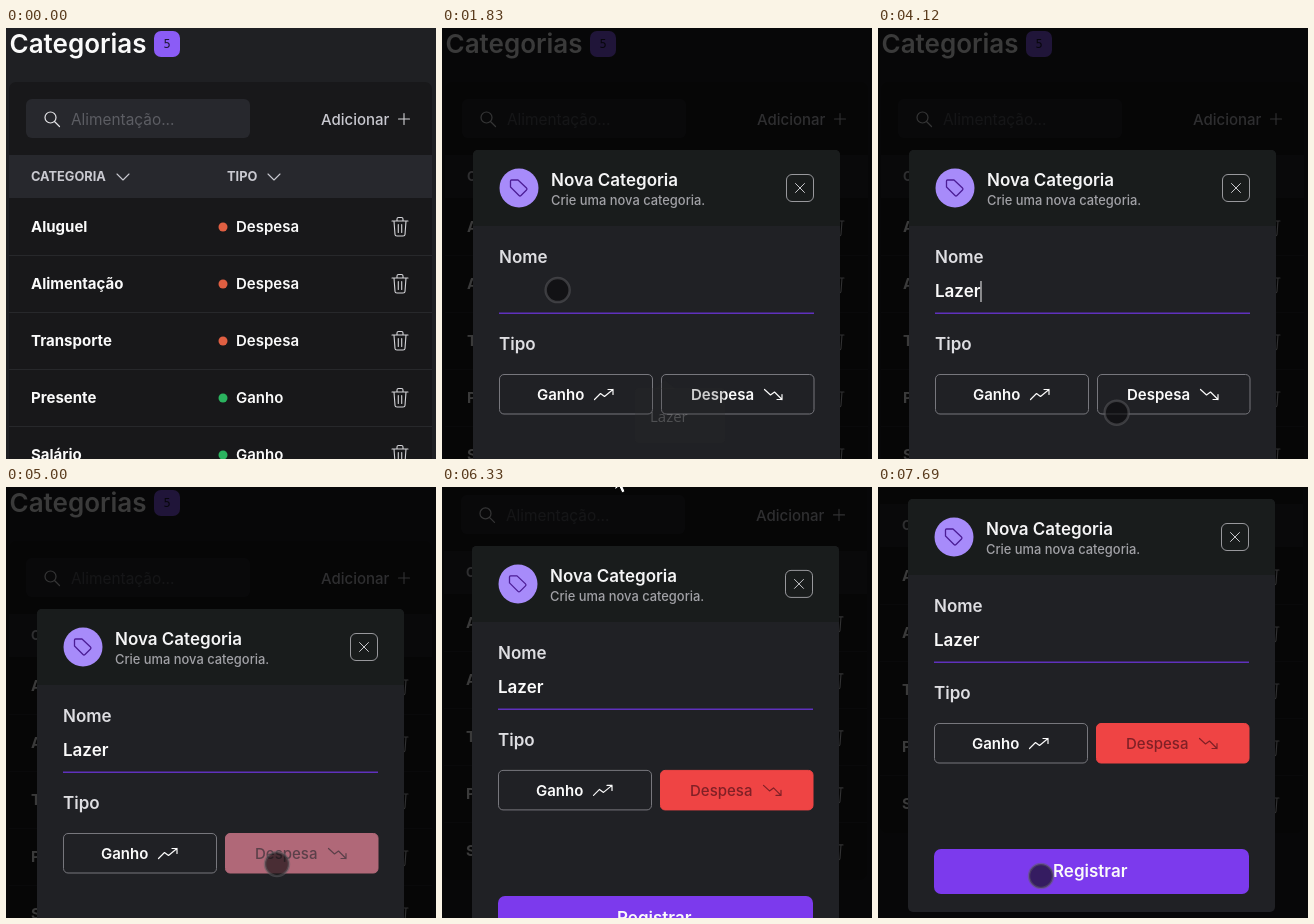
An HTML page with a canvas for the animation above (8 s loop, 430 by 431 pixels).

```html
<!DOCTYPE html>
<html lang="pt">
<head>
<meta charset="utf-8">
<style>
html, body { margin: 0; width: 100%; height: 100%; overflow: hidden; background: #1f2023; }
canvas { display: block; }
</style>
</head>
<body>
<canvas width="430" height="431"></canvas>
<script>
const W = 430, H = 431, LOOP = 8000;
const ctx = document.querySelector('canvas').getContext('2d');

const clamp = v => Math.max(0, Math.min(1, v));
const ramp = (t, a, b) => clamp((t - a) / (b - a));
const smooth = p => p * p * (3 - 2 * p);
const linear = p => p;

// Interpolates rows of [time, value, value, ...].
function track(keys, t, ease = linear) {
  let i = 0;
  while (i < keys.length - 2 && t >= keys[i + 1][0]) i++;
  const [a, b] = [keys[i], keys[i + 1]];
  const p = ease(ramp(t, a[0], b[0]));
  return a.slice(1).map((v, k) => v + (b[k + 1] - v) * p);
}
const rgb = c => `rgb(${c.map(Math.round)})`;

const POINTER = [
  [130, 407, 367], [800, 373, 100], [1350, 373, 100], [1760, 118, 261], [2110, 96, 271],
  [3760, 96, 271], [4300, 288, 424], [4520, 284, 402], [4750, 271, 377], [5040, 271, 377],
  [5350, 184, 42], [5620, 173, -14], [6400, 173, -14], [6700, 173, -18], [7280, 173, -18],
  [7690, 163, 389], [LOOP, 163, 389]
];
const SCROLL = [[5820, 0], [6330, 63], [6680, 98], [6810, 102], [7090, 110]];
const BUTTON = [[4590, 32, 33, 37], [5000, 176, 104, 120], [5300, 239, 68, 68]];
const BUTTON_TEXT = [[4590, 250, 250, 250], [5000, 92, 64, 74], [5300, 128, 32, 38]];
const TYPED = [2570, 2900, 3110, 3430, 3760];

const ICONS = {
  search: new Path2D('M11 5.5A5.5 5.5 0 1 1 0 5.5A5.5 5.5 0 1 1 11 5.5M9.5 9.5L14.5 14.5'),
  plus: new Path2D('M.5 6H11.5M6 .5V11.5'),
  down: new Path2D('M0 0L6 6L12 0'),
  trash: new Path2D('M0 3.5H16M5 3V1.5Q5 0 6.5 0H9.5Q11 0 11 1.5V3M2 3.5L3 17Q3 18.5 5 18.5H11Q13 18.5 13 17L14 3.5M6.3 7V15M9.7 7V15'),
  tag: new Path2D('M1 2V8L9.5 16.5Q10.5 17.5 11.5 16.5L17 11Q18 10 17 9L8.5 1H2Q1 1 1 2Z'),
  rise: new Path2D('M0 11.5L6 5.5L10 8.5L18.5 1.5M13.5 1.5H18.5V6.5'),
  fall: new Path2D('M0 1.5L6 7L10 4L17.5 11.5M12.5 11.5H17.5V6.5'),
  close: new Path2D('M.5 .5L9.5 9.5M9.5 .5L.5 9.5'),
  arrow: new Path2D('M0 0V17L4 13.5L7 20L10 18.5L7.5 12.5H13Z')
};

function text(s, x, y, size, weight, color, family = 'Inter, sans-serif') {
  ctx.font = `${weight} ${size}px ${family}`;
  ctx.fillStyle = color;
  ctx.fillText(s, x, y);
}
function box(x, y, w, h, r, fill, stroke) {
  ctx.beginPath();
  ctx.roundRect(x, y, w, h, r);
  if (fill) { ctx.fillStyle = fill; ctx.fill(); }
  if (stroke) { ctx.strokeStyle = stroke; ctx.lineWidth = 1; ctx.stroke(); }
}
function disc(x, y, r, color) {
  ctx.beginPath();
  ctx.arc(x, y, r, 0, 7);
  ctx.fillStyle = color;
  ctx.fill();
}
function icon(name, x, y, color, width = 1.1) {
  ctx.save();
  ctx.translate(x, y);
  ctx.lineWidth = width;
  ctx.lineJoin = ctx.lineCap = 'round';
  ctx.strokeStyle = color;
  ctx.stroke(ICONS[name]);
  ctx.restore();
}

function page(t) {
  text('Categorias', 3.5, 25, 26, 600, '#fafafa');
  box(148, 3, 26, 26, 7, '#8b5cf6');
  text('5', 157.5, 20, 12, 400, '#1e1836', '"DejaVu Sans Mono", monospace');

  box(3, 54, 423, 402, 7, '#18181a');
  box(20, 71, 224, 39, 6, '#27282d');
  icon('search', 39, 84, '#e4e4e7', 1.2);
  text('Alimentação...', 65, 97, 15.4, 400, '#5c5d63');
  if (t > 1000 && t < 1500) box(315, 80, 94, 22, 0, '#2f9fcc');
  text('Adicionar', 315, 97, 15, 500, '#c9c9d0');
  icon('plus', 392, 85, '#d4d4d8');

  box(3, 127, 423, 43, 0, '#27282d');
  text('CATEGORIA', 25, 153, 12.8, 700, '#c9c9d0');
  icon('down', 111, 146, '#c9c9d0');
  text('TIPO', 221, 153, 12.8, 700, '#c9c9d0');
  icon('down', 262, 146, '#c9c9d0');

  ['Aluguel', 'Alimentação', 'Transporte', 'Presente', 'Salário'].forEach((name, i) => {
    const y = 199 + 57 * i, gain = i > 2;
    text(name, 25, y + 5, 15, 700, '#fafafa');
    disc(217, y, 4.5, gain ? '#2bb35f' : '#e05f42');
    text(gain ? 'Ganho' : 'Despesa', 230, y + 5, 15, 600, '#fafafa');
    icon('trash', 386, y - 9.5, '#d4d4d8');
    if (i < 4) box(3, y + 28, 423, 1, 0, '#27282b');
  });
}

function modal(t) {
  box(31, 122, 367, 413, 5, '#202125');
  box(31, 122, 367, 76, [5, 5, 0, 0], '#191c1c');
  disc(77, 160, 19.5, '#a78bfa');
  icon('tag', 67.5, 151, '#4c1d95', 1.3);
  text('Nova Categoria', 109, 158, 17, 600, '#f4f4f5');
  text('Crie uma nova categoria.', 109, 177, 12.9, 500, '#a1a1a6');
  box(344.5, 146.5, 27, 27, 5.5, null, '#98989c');
  icon('close', 353, 155, '#c8c8cc', 1);

  text('Nome', 57, 235, 17, 600, '#dedee2');
  const typed = 'Lazer'.slice(0, TYPED.filter(k => t >= k).length);
  text(typed, 57, 269, 17, 600, '#fafafa');
  if (t > 1900 && t < 4600) box(57 + ctx.measureText(typed).width, 253, 1, 21, 0, '#f4f4f5');
  box(57, 284.5, 315, 1.5, 0, '#5f31bd');

  text('Tipo', 57, 322, 17, 600, '#dedee2');
  box(57.5, 346.5, 153, 39.5, 4.5, null, '#77777d');
  text('Ganho', 95, 372, 15, 600, '#fafafa');
  icon('rise', 152.5, 360, '#fafafa', 1.2);

  const fill = rgb(track(BUTTON, t)), ink = rgb(track(BUTTON_TEXT, t));
  box(219.5, 346.5, 152.5, 39.5, 4.5, fill, t < 4590 ? '#77777d' : fill);
  text('Despesa', 249, 372, 15, t < 4590 ? 600 : 500, ink);
  icon('fall', 322.5, 360, ink, 1.2);

  box(57, 472, 315, 45, 7, '#7c3aed');
  text('Registrar', 176, 500, 17, 600, '#fafafa');
}

function suggestion() {
  ctx.beginPath();
  ctx.moveTo(212, 361);
  ctx.lineTo(223, 352);
  ctx.lineTo(234, 361);
  ctx.fillStyle = '#2b2b2c';
  ctx.fill();
  box(193, 360, 90, 55, 4, '#2b2b2c');
  text('Lazer', 208, 394, 15, 400, '#fff', '"Open Sans", sans-serif');
}

function pointer(t) {
  if (t < 130) return;
  const [x, y] = track(POINTER, t, smooth);
  if (y > 0) {
    disc(x, y, 12, 'rgba(10,10,12,.62)');
    ctx.strokeStyle = 'rgba(95,95,100,.5)';
    ctx.lineWidth = 2.5;
    ctx.stroke();
  } else {
    ctx.save();
    ctx.translate(x, y);
    ctx.fillStyle = '#fff';
    ctx.fill(ICONS.arrow);
    ctx.restore();
    icon('arrow', x, y, '#000', 1);
  }
}

// Fades a drawing as one group by laying the backdrop over it again.
const backdrop = document.createElement('canvas');
backdrop.width = W;
backdrop.height = H;
function layer(paint, alpha) {
  if (alpha === 1) return paint();
  const copy = backdrop.getContext('2d');
  copy.clearRect(0, 0, W, H);
  copy.drawImage(ctx.canvas, 0, 0);
  paint();
  ctx.setTransform(1, 0, 0, 1, 0, 0);
  ctx.globalAlpha = 1 - alpha;
  ctx.drawImage(backdrop, 0, 0);
  ctx.globalAlpha = 1;
}

function draw(now) {
  const t = now % LOOP;
  const [scroll] = track(SCROLL, t);
  const open = ramp(t, 990, 1204);
  ctx.fillStyle = '#1f2023';
  ctx.fillRect(0, 0, W, H);

  ctx.save();
  ctx.translate(-clamp(scroll / 10), -scroll);
  page(t);
  ctx.restore();

  if (open > 0) {
    ctx.fillStyle = `rgba(0,0,0,${0.77 * open})`;
    ctx.fillRect(0, 0, W, H);
    const zoom = 1.08 - 0.08 * open;
    ctx.save();
    ctx.translate(214.5 - clamp(scroll / 10), 328.5 - scroll);
    ctx.scale(zoom, zoom);
    ctx.translate(-214.5, -328.5);
    layer(() => modal(t), open);
    ctx.restore();
  }
  if (t > 1830 && t < 3900) {
    ctx.globalAlpha = ramp(t, 1800, 1950);
    suggestion();
    ctx.globalAlpha = 1;
  }
  pointer(t);
  requestAnimationFrame(draw);
}

requestAnimationFrame(draw);
</script>
</body>
</html>
```
